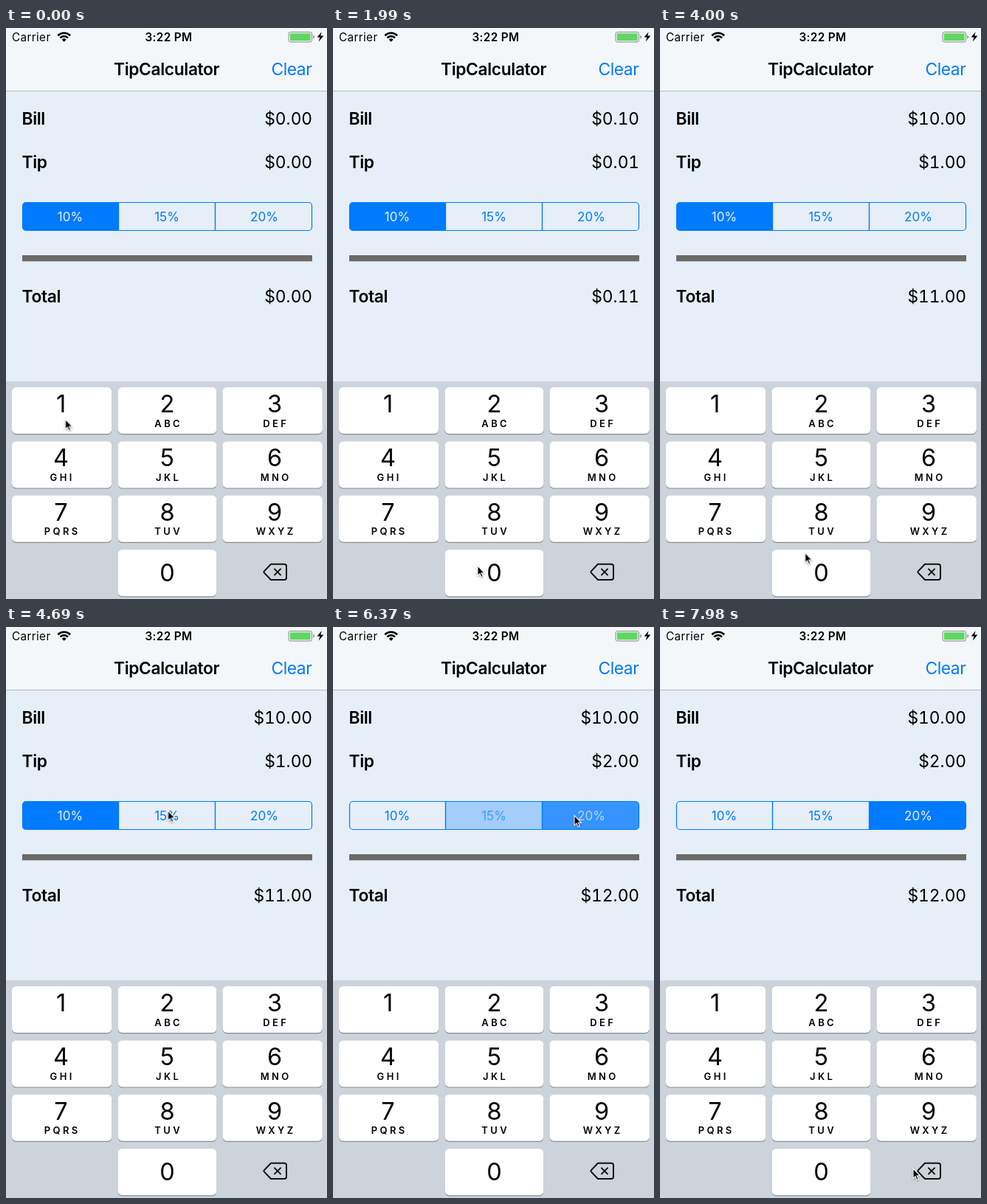
Animation of 435 by 774 pixels, one loop 8 s. Source, as an HTML page:

```html
<!DOCTYPE html>
<html lang="en">
<head>
<meta charset="utf-8">
<title>TipCalculator</title>
<style>
html, body { margin: 0; width: 100%; height: 100%; overflow: hidden; background: #e6eff8; }
svg { display: block; }
text { font: 400 22.8px Inter, sans-serif; white-space: pre; }
.bold { font-weight: 600; letter-spacing: -.38px; }
.status { font-size: 15.3px; letter-spacing: .35px; }
.time { font-weight: 600; }
.blue { fill: #007aff; }
.amount { text-anchor: end; letter-spacing: -.15px; font-variant-numeric: tabular-nums; }
.amount tspan { font-variant-numeric: normal; }
.option { font-size: 17px; text-anchor: middle; }
.digit { font-size: 32.5px; text-anchor: middle; }
.letters { font-size: 13px; font-weight: 600; letter-spacing: 3.4px; text-anchor: middle; }
.key { fill: #fff; }

.strip, .key1, .key0, .pick, #cursor { animation: 8s linear infinite; }
.strip { animation-name: count; animation-timing-function: step-end; }
.key1 { animation-name: press1; animation-timing-function: step-end; }
.key0 { animation-name: press0; animation-timing-function: step-end; }
.pick0 { animation-name: pick0; }
.pick1 { animation-name: pick1; opacity: 0; }
.pick2 { animation-name: pick2; opacity: 0; }
#cursor { animation-name: travel; filter: drop-shadow(0 1px 1px rgba(0, 0, 0, .35)); }

@keyframes count {
  0% { transform: translateY(0); }
  10.35% { transform: translateY(-40px); }
  24.85% { transform: translateY(-80px); }
  31.85% { transform: translateY(-120px); }
  39.5% { transform: translateY(-160px); }
  61.9% { transform: translateY(-200px); }
  78.1%, 100% { transform: translateY(-240px); }
}
@keyframes press1 {
  0%, 10.35%, 100% { fill: #fff; }
  8.87% { fill: #b2c4d1; }
}
@keyframes press0 {
  0%, 24.85%, 31.85%, 39.5%, 100% { fill: #fff; }
  23.4%, 29.75%, 36.75% { fill: #b2c4d1; }
}
@keyframes pick0 {
  0%, 61.9% { opacity: 1; }
  64%, 100% { opacity: 0; }
}
@keyframes pick1 {
  0%, 61.1% { opacity: 0; }
  61.12%, 61.9% { opacity: .2; }
  64%, 78.1% { opacity: 1; }
  80.25%, 100% { opacity: 0; }
}
@keyframes pick2 {
  0%, 77.6% { opacity: 0; }
  77.62%, 78.1% { opacity: .2; }
  80.25%, 100% { opacity: 1; }
}
@keyframes travel {
  0% { transform: translate(80.5px, 530.5px); }
  14.8% { transform: translate(80.5px, 530.5px); animation-timing-function: ease-in-out; }
  21.9%, 36.75% { transform: translate(196px, 729px); }
  38.1% { transform: translate(195px, 730.5px); }
  49.5% { transform: translate(195px, 730.5px); animation-timing-function: ease-in-out; }
  52.75% { transform: translate(228px, 349px); }
  56.4% { transform: translate(228px, 349px); animation-timing-function: ease-out; }
  58.6%, 65.5% { transform: translate(219.5px, 249px); }
  66.62% { transform: translate(258.5px, 250px); animation-timing-function: ease-out; }
  71.6% { transform: translate(327px, 255.5px); }
  86.55% { transform: translate(327px, 255.5px); animation-timing-function: ease-in-out; }
  89.6% { transform: translate(368px, 79px); animation-timing-function: ease-in-out; }
  93.5% { transform: translate(380px, 493px); }
  95.7% { transform: translate(380px, 493px); animation-timing-function: ease-in-out; }
  98.8% { transform: translate(343.5px, 736px); }
  99.7%, 100% { transform: translate(343px, 734px); }
}
</style>
</head>
<body>
<svg width="435" height="774" viewBox="0 0 435 774">
  <rect width="435" height="774" fill="#e6eff8"/>

  <rect width="435" height="85" fill="#f4f7fa"/>
  <rect y="85" width="435" height="1" fill="#b4babf"/>
  <text class="status" x="8" y="17.8">Carrier</text>
  <g fill="none" stroke="#000">
    <path stroke-width="2.7" d="M70.3 10.2A11.9 11.9 0 0 1 87.1 10.2"/>
    <path stroke-width="2.6" d="M73.4 13.3A7.5 7.5 0 0 1 84 13.3"/>
    <path fill="#000" stroke="none" d="M78.7 18.8L75.7 15.7A4.3 4.3 0 0 1 81.7 15.7Z"/>
  </g>
  <text class="status time" x="188.5" y="17.8">3:22 PM</text>
  <rect x="383" y="5.5" width="31.5" height="13.5" rx="2.5" fill="#f4f7fa" stroke="#85898c"/>
  <rect x="384.8" y="7.3" width="27.9" height="9.9" rx="1" fill="#62d663"/>
  <path d="M416.3 9.8a2.6 2.6 0 0 1 0 4.9Z" fill="#85898c"/>
  <path d="M427.6 5.2L421.6 12.6H425.4L423.8 18.6L430.4 10.6H426.3Z"/>
  <text class="bold" x="146" y="63.8">TipCalculator</text>
  <text class="blue" x="359.5" y="63.8" letter-spacing="-.45">Clear</text>

  <g id="rows"></g>
  <g id="options"></g>
  <rect x="22" y="308" width="393" height="8.3" fill="#6b6a67"/>

  <rect y="479" width="435" height="295" fill="#cdd3da"/>
  <g id="keys"></g>
  <g fill="none" stroke="#111" stroke-width="2" stroke-linejoin="round" stroke-linecap="round">
    <path d="M359 726.8H377a3 3 0 0 1 3 3V745a3 3 0 0 1-3 3H359L349.8 738.4q-.9-1 0-2Z"/>
    <path d="M364 733.4l8 8m0-8l-8 8"/>
  </g>

  <path id="cursor" d="M0 0V13.4L3 10.6L5 15.4L7.3 14.4L5.2 9.8H9.5Z" stroke="#fff" stroke-width="1.1"/>
</svg>
<script>
const fill = (id, items, draw) =>
  document.getElementById(id).innerHTML = items.map(draw).join('');

const rows = [
  ['Bill', 123, '0.00 0.01 0.10 1.00 10.00 10.00 10.00'],
  ['Tip', 182, '0.00 0.00 0.01 0.10 1.00 1.50 2.00'],
  ['Total', 364, '0.00 0.01 0.11 1.10 11.00 11.50 12.00']
];
const amount = (value, i) =>
  `<text class="amount" x="415" y="${28.3 + 40 * i}">$${value.replace('.', '<tspan>.</tspan>')}</text>`;
fill('rows', rows, ([label, y, values]) => `
  <text class="bold" x="21.5" y="${y + 8.3}">${label}</text>
  <svg y="${y - 20}" width="435" height="40" overflow="hidden">
    <g class="strip">${values.split(' ').map(amount).join('')}</g>
  </svg>`);

const shapes = [
  'M152.5 236.5H27a4.5 4.5 0 0 0-4.5 4.5V270a4.5 4.5 0 0 0 4.5 4.5H152.5Z',
  'M152.5 236.5H283.5V274.5H152.5Z',
  'M283.5 236.5H410a4.5 4.5 0 0 1 4.5 4.5V270a4.5 4.5 0 0 1-4.5 4.5H283.5Z'
];
fill('options', ['10%', '15%', '20%'], (label, i) => {
  const text = color => `<text class="option" x="${[87, 218, 350][i]}" y="262.2" fill="${color}">${label}</text>`;
  return `<path d="${shapes[i]}" fill="none" stroke="#007aff" stroke-width="1.2"/>${text('#007aff')}
    <g class="pick pick${i}"><path d="${shapes[i]}" fill="#007aff"/>${text('#e8f2fc')}</g>`;
});

const columns = [[8, 135.3, 74.5], [151.6, 133.8, 218.5], [293.5, 135.3, 364]];
const keys = ['1', '2ABC', '3DEF', '4GHI', '5JKL', '6MNO', '7PQRS', '8TUV', '9WXYZ', '', '0'];
fill('keys', keys, (name, i) => {
  if (!name) return '';
  const [x, width, mid] = columns[i % 3];
  const y = 487 + 73.4 * Math.floor(i / 3);
  const digit = name[0];
  const box = `x="${x}" width="${width}" height="63" rx="5.8"`;
  return `<rect ${box} y="${y + 1.2}" fill="#898d91"/>
    <rect class="key key${digit}" ${box} y="${y}"/>
    <text class="digit" x="${mid}" y="${y + (digit === '0' ? 42.6 : 34)}">${digit}</text>
    <text class="letters" x="${mid + 1.7}" y="${y + 53.6}">${name.slice(1)}</text>`;
});
</script>
</body>
</html>
```
